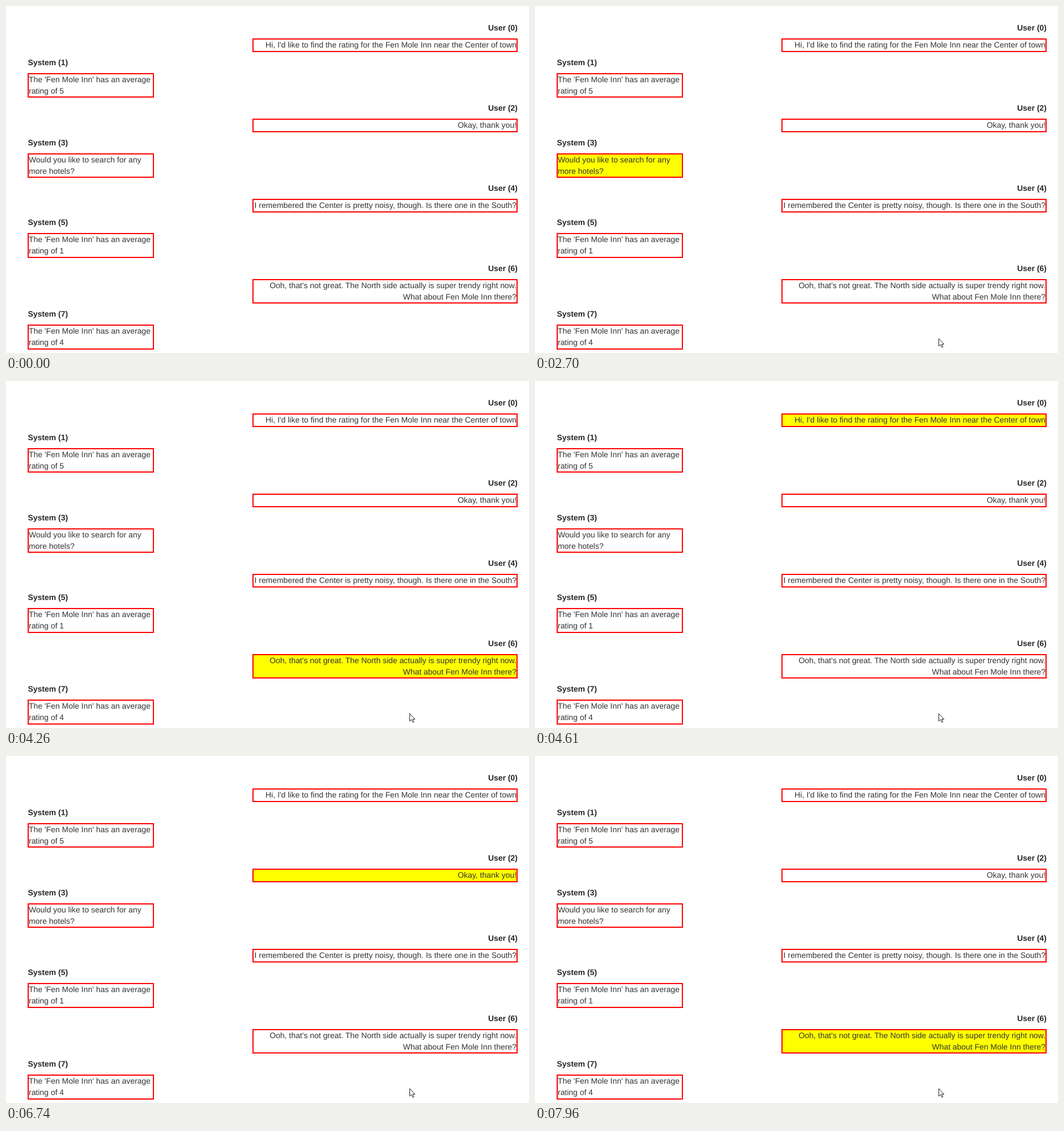
These frames come from a looping animation (919 px wide and 610 px high, 8000 ms). An HTML page:

```html
<!DOCTYPE html>
<html lang="en">
<head>
<meta charset="utf-8">
<title>Dialogue turns</title>
<style>
  html, body { margin: 0; width: 100%; height: 100%; overflow: hidden; background: #fff; }
  svg { display: block; width: 919px; height: 610px; }
  text { font: 13.92px "Liberation Sans", Arial, sans-serif; fill: #333; text-rendering: geometricPrecision; }
  .label { font-weight: bold; fill: #262626; }
  .user { text-anchor: end; }
  rect { fill: #fff; stroke: #f00; stroke-width: 2; }
  .active { fill: #ff0; }
</style>
</head>
<body>
<svg id="stage" viewBox="0 0 919 610">
  <g id="turns"></g>
  <path id="cursor" d="M.5 .7V14L3.6 11.1 5.6 15.9Q6.7 16.8 7.7 15.3L5.7 10.5H9.7Z"
        fill="#fff" stroke="#222" stroke-width="1" stroke-linejoin="round"/>
</svg>
<script>
const LOOP = 8000;
const LINE = 19.6;

// Inner top and bottom of each box, then its lines; user and system alternate.
const turns = [
  [59, 79, "Hi, I'd like to find the rating for the Fen Mole Inn near the Center of town"],
  [120, 159, "The 'Fen Mole Inn' has an average", "rating of 5"],
  [200, 220, "Okay, thank you!"],
  [261, 300, "Would you like to search for any", "more hotels?"],
  [341, 361, "I remembered the Center is pretty noisy, though. Is there one in the South?"],
  [401, 441, "The 'Fen Mole Inn' has an average", "rating of 1"],
  [482, 521, "Ooh, that's not great. The North side actually is super trendy right now.",
    "What about Fen Mole Inn there?"],
  [562, 602, "The 'Fen Mole Inn' has an average", "rating of 4"]
];

// [start time, highlighted turn]
const highlights = [
  [0, -1], [1100, 0], [1800, 1], [2300, 2], [2700, 3], [2800, 4], [3060, 2],
  [3360, 1], [3610, 2], [3960, 5], [4260, 6], [4410, 7], [4610, 0],
  [5680, 3], [6740, 2], [7100, 3], [7810, 5], [7890, 7], [7960, 6]
];

// [start time, x, y]
const pointer = [
  [0, 709, 620], [1250, 710, 598], [1300, 709, 585], [1350, 709, 577],
  [1500, 709, 580], [1550, 709, 584]
];

const group = document.getElementById("turns");
const cursor = document.getElementById("cursor");

function add(tag, attributes, content = "") {
  const node = document.createElementNS("http://www.w3.org/2000/svg", tag);
  for (const [name, value] of Object.entries(attributes)) node.setAttribute(name, value);
  node.textContent = content;
  return group.appendChild(node);
}

const boxes = turns.map(([top, bottom, ...lines], i) => {
  const isUser = i % 2 === 0;
  const [left, right] = isUser ? [435, 897] : [40, 258];
  const side = isUser ? "user" : "system";
  const box = add("rect", { x: left - 1, y: top - 1, width: right - left + 2, height: bottom - top + 2 });
  add("text", { class: `label ${side}`, x: isUser ? 899 : 38.5, y: top - 16 },
    `${isUser ? "User" : "System"} (${i})`);
  lines.forEach((line, row) =>
    add("text", { class: side, x: isUser ? right : left, y: top + 14 + row * LINE }, line));
  return box;
});

const current = (steps, time) => steps.findLast(step => step[0] <= time);

function render(now) {
  const time = Math.max(0, now) % LOOP;
  const active = current(highlights, time)[1];
  boxes.forEach((box, i) => box.classList.toggle("active", i === active));
  const [, x, y] = current(pointer, time);
  cursor.setAttribute("transform", `translate(${x} ${y})`);
}

const start = performance.now();
function tick() {
  render(performance.now() - start);
  requestAnimationFrame(tick);
}
tick();
</script>
</body>
</html>
```
